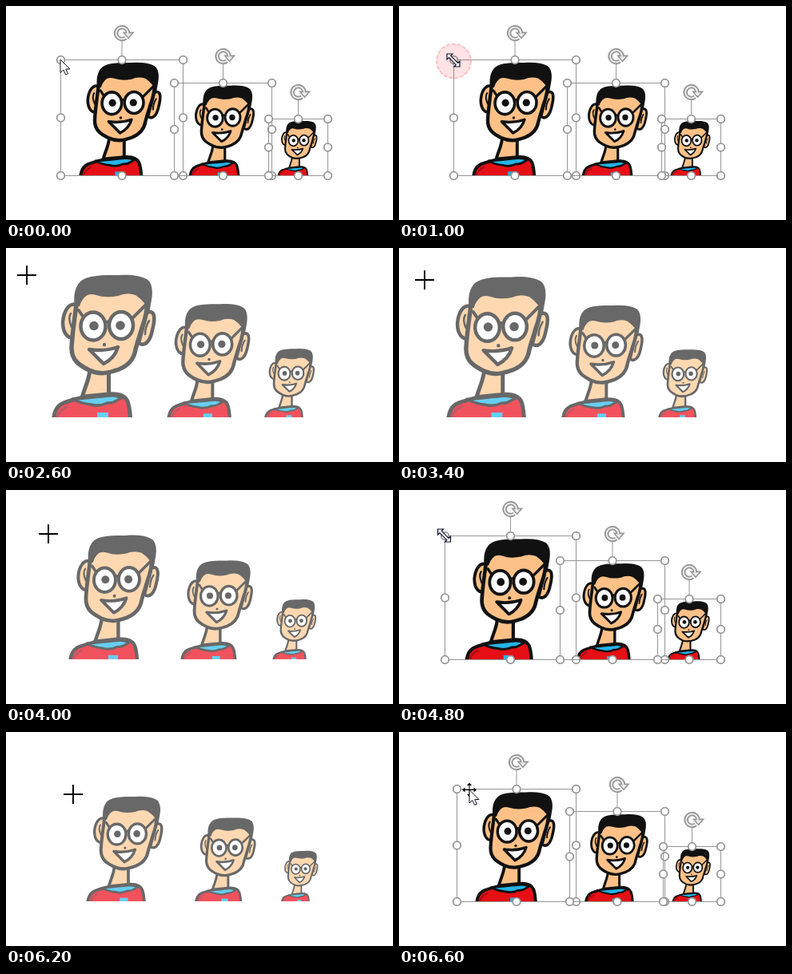
Animation of 484 by 268 pixels, one loop 7200 ms. Source, as an HTML page with a canvas:

```html
<!DOCTYPE html>
<html lang="en">
<head>
<meta charset="utf-8">
<title>Resizing a group of pictures</title>
<style>
html, body { margin: 0; width: 100%; height: 100%; overflow: hidden; background: #fff; }
canvas { display: block; }
</style>
</head>
<body>
<canvas id="stage" width="484" height="268"></canvas>
<script>
const ctx = document.getElementById('stage').getContext('2d');
const LOOP = 7200, BASE = 212.5, GRAY = '#969696';

// Bottom-right anchors and sizes at scale 1
const boxes = [
  { right: 221.5, w: 153, h: 145 },
  { right: 332.5, w: 122, h: 116 },
  { right: 402.5, w: 74, h: 71 }
];

const solid = { ink: '#111', skin: '#fdc187', red: '#e60f16', dark: '#a30d14', cyan: '#24b4e8' };
const ghost = { ink: '#686868', skin: '#fed8b1', red: '#f2525e', dark: '#b95b66', cyan: '#66cff2' };

// [start ms, scale, cursor, x, y, click ring as [x, y]]
const press1 = [68.5, 69], press2 = [58, 57];
const steps = [
  [0, 1, 'arrow', 68, 67],
  [800, 1, 'resize', 68, 68],
  [1000, 1, 'resize', 68, 68, press1],
  [1200, 1, 'cross', 68, 69, press1],
  [1600, 1.01, 'drag', 66, 67, press1],
  [1800, 1.035, 'drag', 61, 63, press1],
  [2000, 1.1, 'drag', 49, 53],
  [2200, 1.17, 'drag', 37, 44],
  [2400, 1.235, 'drag', 29, 37],
  [2600, 1.262, 'drag', 26, 34],
  [2800, 1.265, 'drag', 24, 34],
  [3000, 1.265, 'drag', 22, 35],
  [3400, 1.245, 'drag', 32, 40],
  [3600, 1.2, 'drag', 39, 45],
  [3800, 1.15, 'drag', 47, 51],
  [4000, 1.1, 'drag', 53, 55],
  [4200, 1.07, 'drag', 57, 57],
  [4400, 1.067, 'resize', 56.5, 57],
  [5000, 1.04, 'drag', 62, 62, press2],
  [5200, 0.92, 'drag', 90, 81],
  [5400, 0.782, 'drag', 122, 100],
  [5600, 0.75, 'drag', 128, 104],
  [6000, 0.84, 'drag', 106, 91],
  [6200, 0.93, 'drag', 84, 78],
  [6400, 0.968, 'resize', 74, 72],
  [6600, 0.968, 'move', 88, 72.5]
];

function paint(path, fill, stroke, width) {
  const p = typeof path === 'string' ? new Path2D(path) : path;
  if (fill) { ctx.fillStyle = fill; ctx.fill(p); }
  if (stroke) { ctx.strokeStyle = stroke; ctx.lineWidth = width; ctx.stroke(p); }
}

function oval(x, y, rx, ry = rx) {
  const p = new Path2D();
  p.ellipse(x, y, rx, ry, 0, 0, 7);
  return p;
}

// The figure is laid out at scale 1.262 against the first box
function drawFigure(box, scale, c) {
  const k = scale * box.w / 153 / 1.262;
  ctx.save();
  ctx.beginPath();
  ctx.rect(0, 0, 484, 212);
  ctx.clip();
  ctx.translate(box.right, BASE);
  ctx.scale(k, k);
  ctx.translate(-221.5, -BASE);
  ctx.lineJoin = ctx.lineCap = 'round';

  // Neck and shirt
  paint('M105 152C104 166 98 175 95 188L128.5 188L128.5 152Z', c.skin, c.ink, 5);
  paint('M59 218C60 205 63 198 72 194C82 190 90 189 98 186L128 183C140 182 149 185 152 192' +
    'C155 199 155 208 156 218Z', c.red, c.ink, 5);
  paint('M64 212Q67 203 76 199', null, c.dark, 3);
  paint('M83 189C95 189 115 186 129 185Q138 184 144 188C139 190 136 195 127 194' +
    'Q117 199 106 196Q94 195 83 189Z', c.cyan, c.ink, 3.5);
  paint('M114 206H128V216H114Z', c.cyan);

  // Ears
  paint('M88 71C78 68 72 80 71 93C71 107 78 115 86 111Z', c.skin, c.ink, 4.5);
  paint('M81 82Q77 88 82 99', null, c.ink, 2.5);
  paint('M176 81C188 76 186 91 183 103C180 118 173 124 166 119Z', c.skin, c.ink, 4.5);
  paint('M179 91Q174 99 174 108', null, c.ink, 2.5);

  // Face and hair
  paint('M89 62C87 82 83 103 82 125C82 141 92 147 104 153C117 159 127 157 141 152' +
    'C153 147 160 140 162 127C165 115 168 108 170 100C174 90 177 80 177 62L160 50L104 50Z', c.skin, c.ink, 5.5);
  paint('M86 73C84 60 86 48 94 41C103 34 120 34 140 34C155 33 167 34 176 39' +
    'C183 43 184 55 182 65L179 82L173 69Q168 63 162 59Q151 55 140 60Q124 63 113 59' +
    'Q103 56 98 62Q94 66 92 73Z', c.ink);

  // Glasses, nose and mouth
  paint('M97 87L91 78M157 89L179 67M123 94Q127 91 131 94', null, c.ink, 4);
  paint(oval(109, 98, 15.5, 17.5), '#fff', c.ink, 4.5);
  paint(oval(144, 97, 15, 17), '#fff', c.ink, 4.5);
  paint(oval(110, 97.5, 5.8), c.ink);
  paint(oval(143, 97, 5.8), c.ink);
  paint(oval(123, 121, 2.2), c.ink);
  paint('M104 127Q123 130 140 124Q136 138 122 145Q115 138 104 127Z', '#fff', c.ink, 4.5);
  ctx.restore();
}

function drawSelection(box, scale) {
  const left = Math.round(box.right - box.w * scale) - 0.5;
  const top = Math.round(BASE - box.h * scale) - 0.5;
  const midX = (left + box.right) / 2, midY = (top + BASE) / 2;

  paint(`M${left} ${top}H${box.right}V${BASE}H${left}ZM${midX} ${top}V${top - 25}`, null, GRAY, 1);
  for (const x of [left, midX, box.right])
    for (const y of [top, midY, BASE])
      if (x !== midX || y !== midY) paint(oval(x, y, 4.8), '#fff', GRAY, 1.8);

  ctx.save();
  ctx.translate(midX, top - 33.5);
  const turn = 'M4.6 5.8A7.4 7.4 0 1 1 7.4 0';
  paint(turn, null, GRAY, 5.4);
  paint('M2.2 -.6H14L8 6.2Z', '#eee', GRAY, 1.6);
  paint(turn, null, '#eee', 1.8);
  ctx.restore();
}

function drawPointer() {
  paint('M0 0V16.5L3.8 13L6.6 19L9.4 17.8L6.8 12H12Z', '#fff', '#101020', 1);
}

const cursors = {
  arrow: drawPointer,
  cross: () => paint('M-12 0H12M0 -12V12', null, '#000', 2),
  resize: () => paint('M-8 -8H-1L-3.3 -5.7L5.7 3.3L8 1V8H1L3.3 5.7L-5.7 -3.3L-8 -1Z', '#fff', '#101030', 1.2),
  move() {
    paint('M-7 0H7M0 -7V7', null, '#000', 1);
    for (let i = 0; i < 4; i++) {
      paint('M9 0L5.5 -3V3Z', '#000');
      ctx.rotate(Math.PI / 2);
    }
    drawPointer();
  }
};
cursors.drag = cursors.cross;

function drawRing([x, y]) {
  ctx.setLineDash([5, 2]);
  paint(oval(x, y, 21.5), 'rgba(255,30,40,.12)', 'rgba(245,80,80,.32)', 1.8);
  ctx.setLineDash([]);
}

function draw(time) {
  const [, scale, cursor, x, y, ring] = steps.findLast(step => step[0] <= time);
  const dragging = cursor === 'drag';
  ctx.fillStyle = '#fff';
  ctx.fillRect(0, 0, 484, 268);
  boxes.forEach(box => drawFigure(box, scale, dragging ? ghost : solid));
  if (!dragging) boxes.forEach(box => drawSelection(box, scale));
  if (ring) drawRing(ring);
  ctx.save();
  ctx.translate(x, y);
  cursors[cursor]();
  ctx.restore();
}

const start = performance.now();
function tick() {
  draw((performance.now() - start) % LOOP);
  requestAnimationFrame(tick);
}
tick();
</script>
</body>
</html>
```
